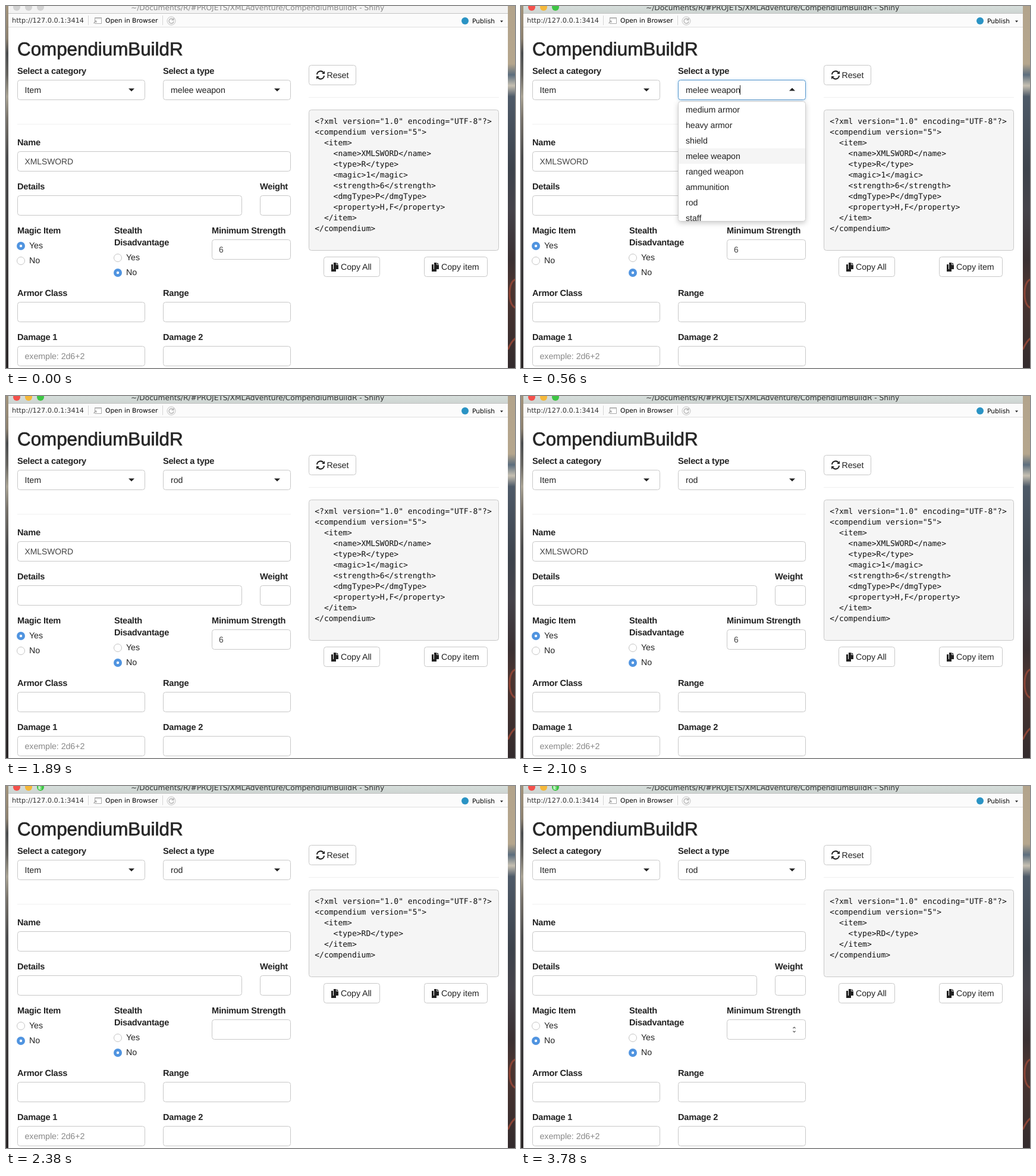
An HTML page for the animation above (3850 ms loop, 856 by 608 pixels).

```html
<!DOCTYPE html>
<html lang="en">
<head>
<meta charset="utf-8">
<title>CompendiumBuildR</title>
<style>
html, body { margin: 0; width: 100%; height: 100%; overflow: hidden; background: #fff; }
svg { display: block; }
text { font: 14.2px "Liberation Sans", Arial, sans-serif; fill: #222; letter-spacing: -.04px;
  white-space: pre; text-rendering: geometricPrecision; }
.label { font-weight: bold; font-size: 14.6px; letter-spacing: -.24px; }
.heading { font-size: 31.4px; fill: #262626; stroke: #262626; stroke-width: .7px; }
.value { font-size: 13.9px; fill: #444; }
.hint { fill: #888; }
.bar { font: 10.7px "DejaVu Sans", sans-serif; fill: #000; letter-spacing: 0; }
.url { font-size: 11.3px; fill: #333; }
.title { font-size: 12.2px; fill: #333; }
.code { font: 13px "DejaVu Sans Mono", monospace; fill: #111; letter-spacing: 0; }
.box { fill: #fff; stroke: #c8c8c8; }
.pre { fill: #f5f5f5; }
.focus { stroke: #5a98cc; filter: drop-shadow(0 0 2px #66afe980); }
.menu { stroke: #d0d0d0; filter: drop-shadow(0 3px 4px #0003); }
</style>
</head>
<body>
<svg id="stage" width="856" height="608" viewBox="0 0 856 608">
  <defs>
    <linearGradient id="left" x2="0" y2="1">
      <stop offset="0" stop-color="#a3947c"/><stop offset=".09" stop-color="#8c8170"/>
      <stop offset=".13" stop-color="#4a4c4e"/><stop offset=".19" stop-color="#66645f"/>
      <stop offset=".25" stop-color="#aaa495"/><stop offset=".31" stop-color="#77726a"/>
      <stop offset=".42" stop-color="#4a4a4b"/><stop offset="1" stop-color="#2b2728"/>
    </linearGradient>
    <linearGradient id="right" x2="0" y2="1">
      <stop offset="0" stop-color="#b3a48c"/><stop offset=".16" stop-color="#b5a68d"/>
      <stop offset=".19" stop-color="#5d6e7e"/><stop offset=".22" stop-color="#c6c0b2"/>
      <stop offset=".25" stop-color="#4e5a68"/><stop offset=".45" stop-color="#3d434c"/>
      <stop offset=".56" stop-color="#45434a"/><stop offset=".7" stop-color="#3a3032"/>
      <stop offset=".78" stop-color="#4c3531"/><stop offset="1" stop-color="#332b2d"/>
    </linearGradient>
    <linearGradient id="chrome" x2="0" y2="1">
      <stop offset="0" stop-color="#d6dedb"/><stop offset="1" stop-color="#cdd4d1"/>
    </linearGradient>
    <clipPath id="menuClip"><path d="M265 161h213v200H265z"/></clipPath>
  </defs>
</svg>
<script>
const LOOP = 3850;
const HOVERS = [[0, 3], [980, 4], [1050, 5], [1120, 6]];
const ITEMS = ["medium armor", "heavy armor", "shield", "melee weapon",
  "ranged weapon", "ammunition", "rod", "staff"];

const escape = s => s.replace(/&/g, "&amp;").replace(/</g, "&lt;");
const text = (x, y, s, cls = "") => `<text x="${x}" y="${y}" class="${cls}">${escape(s)}</text>`;
const label = (x, y, s) => text(x, y, s, "label");
const rect = (x, y, w, h, fill) => `<rect x="${x}" y="${y}" width="${w}" height="${h}" fill="${fill}"/>`;
const box = (x, y, w, h = 34, cls = "") =>
  `<rect x="${x + .5}" y="${y + .5}" width="${w - 1}" height="${h - 1}" rx="4" class="box ${cls}"/>`;
const path = (d, stroke = "none", fill = "none", width = 1) =>
  `<path d="${d}" stroke="${stroke}" fill="${fill}" stroke-width="${width}"/>`;
const circle = (x, y, r, fill, stroke = "none") =>
  `<circle cx="${x}" cy="${y}" r="${r}" fill="${fill}" stroke="${stroke}"/>`;
const group = (id, ...parts) => `<g id="${id}">${parts.join("")}</g>`;
const arrow = (x, y, dir = 1) => path(`M${x - 5} ${y - 2.5 * dir}h10l-5 ${5 * dir}z`, "none", "#222");

const radio = (x, y, on) => on
  ? circle(x, y, 7, "#5094e0") + circle(x, y, 2.2, "#fff")
  : circle(x, y, 6.5, "#fff", "#c4c4c4");
const magic = yes => radio(25, 403, yes) + radio(25, 428, !yes);
const lights = colors => colors.map((c, i) => circle(18 + 20 * i, 2, 6, c)).join("");

const copyIcon = x =>
  path(`M${x} 434h3v8h5v4h-8z`, "none", "#222") +
  path(`M${x + 4} 431h5l3 3v8h-8z`, "none", "#222") +
  path(`M${x + 8.5} 431v3.5h3.5`, "#fff", "none", .8);
const copyButton = (x, w, s) => box(x, 421, w) + copyIcon(x + 13) + text(x + 29, 443, s);

const listing = (height, lines) => box(509, 174, 320, height, "pre") +
  lines.map((s, i) => text(519.3, 198 + 18 * i, s, "code")).join("");
const xml = fields => ['<?xml version="1.0" encoding="UTF-8"?>', '<compendium version="5">', "  <item>",
  ...fields.map(([tag, v]) => `    <${tag}>${v}</${tag}>`), "  </item>", "</compendium>"];

const wallpaper = rect(0, 0, 5, 608, "url(#left)") + rect(843, 0, 13, 608, "url(#right)") +
  path("M857 459q-10 4-10 24t10 24M844 577q6-14 13-19", "#8a4436", "none", 3);

const windowBar = rect(4, 0, 840, 608, "#fff") +
  group("inactive", rect(4, 0, 840, 12, "#f3f3f3"), lights(["#d2d2d2", "#d2d2d2", "#d2d2d2"])) +
  group("active", rect(4, 0, 840, 12, "url(#chrome)"), lights(["#f4514c", "#f5b83a", "#3ec545"])) +
  group("zoomMark", path("M55.5 0v5h4M54.5 2h5", "#effff0", "none", 1.6)) +
  `<g id="caption">${text(210, 7, "~/Documents/R/#PROJETS/XMLAdventure/CompendiumBuildR - Shiny", "bar title")}</g>` +
  rect(4, 12, 840, 1, "#c4c4c4") + rect(4, 13, 840, 22, "#fbfbfb") + rect(4, 35, 840, 1, "#dedede") +
  text(10, 28, "http://127.0.0.1:3414", "bar url") +
  path("M138.5 16v16M263.5 16v16", "#d5d5d5") +
  path("M149.5 19.5h11v10h-11zM149 21h12", "#aaa", "#fff") + path("M147 29l5-4M149 25h3v3", "#999") +
  text(167, 28, "Open in Browser", "bar") +
  circle(278, 25, 7, "#fafafa", "#c4c4c4") + path("M281 22.5a4 4 0 1 0 1 3.5M282 20v3.5h-3.5", "#b5b5b5", "none", 1.4) +
  circle(772, 25, 6, "#2a93c4") + text(784, 29, "Publish", "bar") +
  path("M831 24.5h5l-2.5 3z", "none", "#222");

const form = text(19, 83, "CompendiumBuildR", "heading") +
  label(19, 114, "Select a category") + box(19, 124, 215) + text(31.5, 146, "Item") + arrow(211, 141) +
  label(264, 114, "Select a type") +
  rect(19, 198, 460, 1, "#f0f0f0") + rect(509, 153, 320, 1, "#f0f0f0") +
  box(509, 99, 80) + text(539.5, 121, "Reset") +
  path("M523 115a6 6 0 0 1 10.5-3.5M535 117a6 6 0 0 1-10.5 3.5", "#222", "none", 2) +
  path("M536 109v5h-5zM522 123v-5h5z", "none", "#222") +
  label(19, 234, "Name") + box(19, 244, 460) +
  label(19, 308, "Details") + box(19, 318, 378) + label(427, 308, "Weight") + box(427, 318, 52) +
  label(19, 382, "Magic Item") + text(39, 407, "Yes") + text(39, 432, "No") +
  label(182, 382, "Stealth") + label(182, 402, "Disadvantage") +
  radio(188, 423, false) + radio(188, 448, true) + text(202, 427, "Yes") + text(202, 452, "No") +
  label(346, 382, "Minimum Strength") + box(346, 392, 133) +
  label(19, 487, "Armor Class") + box(19, 497, 215) + label(264, 487, "Range") + box(264, 497, 215) +
  label(19, 561, "Damage 1") + box(19, 571, 215) + text(31.5, 593, "exemple: 2d6+2", "hint") +
  label(264, 561, "Damage 2") + box(264, 571, 215);

const filled = group("filled",
  text(31.5, 266, "XMLSWORD", "value"), text(358, 414, "6", "value"), magic(true),
  listing(237, xml([["name", "XMLSWORD"], ["type", "R"], ["magic", 1], ["strength", 6],
    ["dmgType", "P"], ["property", "H,F"]])));
const cleared = group("cleared", magic(false), listing(147, xml([["type", "RD"]])));
const copies = group("copies", copyButton(534, 95, "Copy All"), copyButton(703, 107, "Copy item"));
const spinner = group("spinner", path("M457.5 407l2-2 2 2M457.5 411.5l2 2 2-2", "#555", "none", 1.1));

const select = group("closed", box(264, 124, 215), arrow(456, 141)) +
  group("open", box(264, 124, 215, 34, "focus"), arrow(456, 140, -1), rect(368, 133, 1, 16, "#222"),
    box(264, 160, 215, 202, "menu"),
    `<g clip-path="url(#menuClip)">`, group("hover", rect(265, 161, 213, 26, "#f5f5f5")),
    ...ITEMS.map((s, i) => text(277, 179 + 26 * i, s)), "</g>") +
  group("melee", text(277, 146, "melee weapon")) + group("rod", text(277, 146, "rod"));

document.getElementById("stage").insertAdjacentHTML("beforeend",
  wallpaper + windowBar + form + filled + cleared + copies + spinner + select);

const el = id => document.getElementById(id);
const show = (id, on) => el(id).setAttribute("visibility", on ? "visible" : "hidden");
const move = (id, y) => el(id).setAttribute("transform", `translate(0 ${y})`);

function render(t) {
  const active = t >= 210, open = t >= 280 && t < 1750, picked = t >= 1750, reset = t >= 2240;
  show("inactive", !active);
  show("active", active);
  el("caption").setAttribute("opacity", active ? 1 : .55);
  show("zoomMark", reset);
  show("open", open);
  show("closed", !open);
  show("melee", !picked);
  show("rod", picked);
  show("filled", !reset);
  show("cleared", reset);
  show("spinner", t >= 3640);
  move("copies", reset ? -90 : 0);
  move("hover", 26 * HOVERS.findLast(([start]) => t >= start)[1]);
}

function tick() {
  render(performance.now() % LOOP);
  requestAnimationFrame(tick);
}
tick();
</script>
</body>
</html>
```
